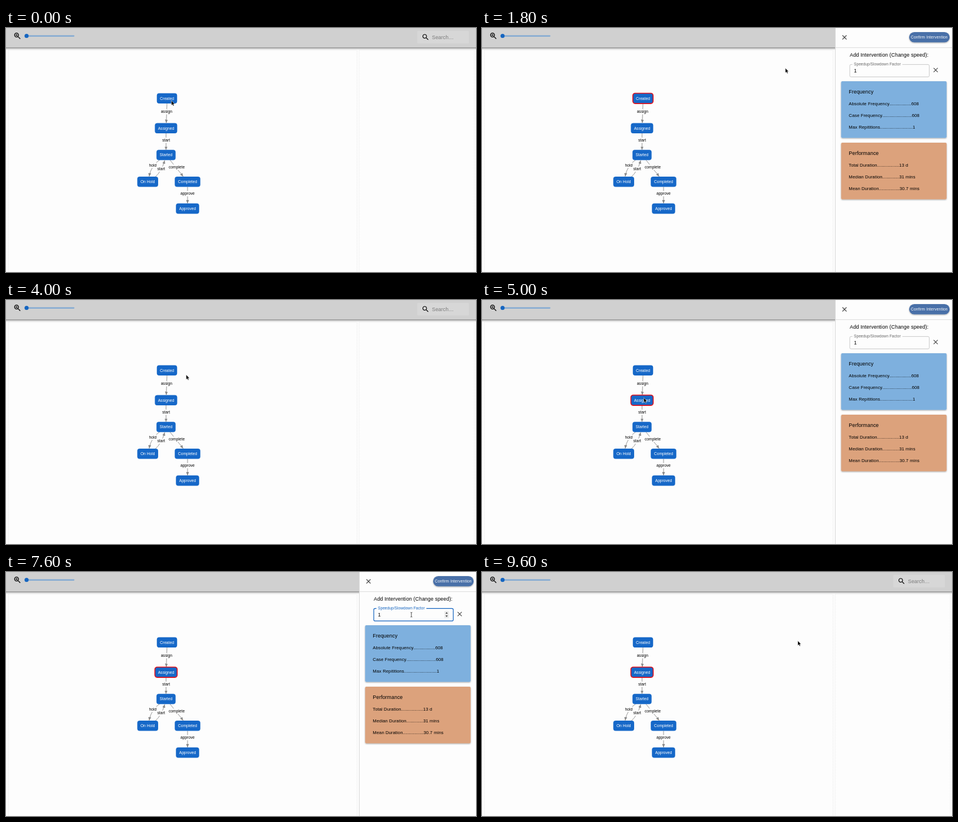
Write an HTML page that moves like this. It is 800 px wide and 417 px high and loops after 9700 ms.

```html
<!DOCTYPE html>
<html lang="en">
<head>
<meta charset="utf-8">
<title>Process graph intervention</title>
<style>
html, body { margin: 0; width: 100%; height: 100%; overflow: hidden; background: #fdfdfd; }
svg { display: block; width: 100%; height: 100%; font-family: "Liberation Sans", Arial, sans-serif; }
.graph text { font-size: 6.7px; text-anchor: middle; }
.node rect { fill: #1668c8; }
.node text { fill: #fff; }
.node.selected rect { stroke: #e3121c; stroke-width: 1.6; }
.edge { fill: none; stroke: #8c8c8c; stroke-width: .9; marker-end: url(#arrow); }
.frame { fill: none; stroke: #e6e6e6; stroke-width: .8; stroke-dasharray: 1.5 1; }
.title { font-size: 8.75px; letter-spacing: .00938em; }
.row { font-size: 7.65px; letter-spacing: .01071em; }
.cross { stroke: #444; stroke-width: 1.1; }
</style>
</head>
<body>
<svg viewBox="0 0 800 417" preserveAspectRatio="none">
  <defs>
    <marker id="arrow" viewBox="0 0 6 5" refX="5.5" refY="2.5" markerWidth="6" markerHeight="5"
      markerUnits="userSpaceOnUse" orient="auto"><path d="M0 0L6 2.5L0 5z" fill="#8c8c8c"/></marker>
    <linearGradient id="shade" x2="0" y2="1">
      <stop stop-color="#000" stop-opacity=".48"/>
      <stop offset=".4" stop-color="#000" stop-opacity=".2"/>
      <stop offset="1" stop-color="#000" stop-opacity="0"/>
    </linearGradient>
    <filter id="lift" x="-10%" y="-20%" width="120%" height="150%">
      <feDropShadow dx="0" dy="1" stdDeviation=".8" flood-opacity=".35"/>
    </filter>
    <path id="lens" d="M15.5 14h-.79l-.28-.27C15.41 12.59 16 11.11 16 9.5 16 5.91 13.09 3 9.5 3S3 5.91 3 9.5 5.91 16 9.5 16c1.61 0 3.09-.59 4.23-1.57l.27.28v.79l5 4.99L20.49 19l-4.99-5zm-6 0C7.01 14 5 11.99 5 9.5S7.01 5 9.5 5 14 7.01 14 9.5 11.99 14 9.5 14z"/>
  </defs>

  <rect width="800" height="417" fill="#fdfdfd"/>
  <rect class="frame" x="4" y="38" width="593.5" height="390"/>
  <rect class="frame" x="601" y="38" width="196" height="390"/>
  <g class="graph" id="graph"></g>

  <rect width="800" height="33.5" fill="#d0d0d0"/>
  <rect y="33.3" width="800" height="4.5" fill="url(#shade)"/>
  <g transform="translate(12 6.2) scale(.62)"><use href="#lens"/><path d="M12 10h-2v2H9v-2H7V9h2V7h1v2h2v1z" stroke="#000" stroke-width=".5"/></g>
  <rect x="35" y="12.4" width="81.5" height="2.3" rx="1.1" fill="#7ea8d3"/>
  <circle cx="35" cy="13.6" r="3.5" fill="#1565c0"/>
  <rect x="700" y="5" width="88" height="21.5" rx="2" fill="#d7d7d7"/>
  <use href="#lens" transform="translate(707.2 8.7) scale(.58)"/>
  <text x="725" y="19" class="title" fill="#7b7b7b">Search…</text>

  <g id="drawer">
    <rect x="601.5" width="200" height="417" fill="#fdfdfd"/>
    <path d="M601.5 0V417M601.5 33.6H800" stroke="#dcdcdc"/>
    <path class="cross" d="M613.5 12.5l7 7m0-7l-7 7M768.7 68.4l7 7m0-7l-7 7"/>
    <rect id="button" x="727" y="7" width="69" height="17.6" rx="8.8" filter="url(#lift)"/>
    <text x="730" y="18.2" fill="#fff" font-size="6.56" letter-spacing=".187">Confirm Intervention</text>
    <text x="626" y="48.7" class="title">Add Intervention (Change speed):</text>
    <rect id="field" x="626" y="62.4" width="135.3" height="21.2" rx="2.2" fill="none"/>
    <rect x="630.5" y="60" width="85" height="5" fill="#fdfdfd"/>
    <text id="label" x="633" y="64.4" font-size="6.56" letter-spacing=".06">Speedup/Slowdown Factor</text>
    <text id="value" x="633" y="76.3" class="title"></text>
    <g id="spinner">
      <rect x="746" y="66.5" width="8" height="12.5" rx="1.5" fill="#ececec"/>
      <path d="M748 71.2l2-2.8 2 2.8zM748 74.3l2 2.8 2-2.8z" fill="#444"/>
    </g>
    <g id="cards"></g>
  </g>

  <g id="cursor" stroke="#fff" stroke-width=".5" stroke-linejoin="round">
    <path id="pointer" d="M0 0V8.2L1.8 6.6L3.1 9.3L4.5 8.7L3.3 6H5.7z"/>
    <path id="hand" d="M-.9 .7Q0 -.7 .8 .7V3.4Q1.7 2.8 2.4 3.7Q3.4 3.2 3.9 4.2Q5.2 4 5.1 5.4L4.3 9.3H-.7L-3.3 5.7Q-3 4.4 -.9 6z"
      fill="#fff" stroke="#111" stroke-width=".8"/>
    <path id="beam" d="M-1.5 -4Q0 -4 0 -3V3Q0 4 1.5 4M1.5 -4Q0 -4 0 -3M0 3Q0 4 -1.5 4" fill="none" stroke="#222" stroke-width=".8"/>
  </g>
</svg>
<script>
const LOOP = 9700, STEP = 100;
const $ = id => document.getElementById(id);

const nodes = [
  ["Created", 274, 120.3, 34.5], ["Assigned", 272.4, 171.3, 38], ["Started", 272.4, 217, 32.5],
  ["On Hold", 241.2, 262.8, 35.5], ["Completed", 309, 262.8, 43.5], ["Approved", 309, 308.6, 39.5]
];
const edges = [
  ["assign", 273.3, 143.2, "M274 129L272.8 162"],
  ["start", 272.5, 191.8, "M272.4 180V208"],
  ["hold", 249.8, 234.6, "M262 225Q247 235 243.7 253.5"],
  ["start", 264, 241.2, "M254 254.5Q265 245 270 226.5"],
  ["complete", 290.6, 237.8, "M279 225.5L301.5 253.5"],
  ["approve", 309, 283.2, "M309 271.5V299.5"]
];
$("graph").innerHTML =
  edges.map(e => `<path class="edge" d="${e[3]}"/>`).join("") +
  edges.map(([name, x, y]) => {
    const w = name.length * 3.4;
    return `<rect x="${x - w / 2}" y="${y - 4.5}" width="${w}" height="9" fill="#fdfdfd"/>
      <text x="${x}" y="${y + 2}">${name}</text>`;
  }).join("") +
  nodes.map(([name, x, y, w]) => `<g class="node" id="${name}">
    <rect x="${x - w / 2}" y="${y - 8.8}" width="${w}" height="17.6" rx="4"/>
    <text x="${x}" y="${y + 2.2}">${name}</text></g>`).join("");

const cards = [
  [91, "#7eb0de", "Frequency", [["Absolute Frequency", 17, "608"], ["Case Frequency", 23, "608"], ["Max Repititions", 25, "1"]]],
  [196, "#dca27c", "Performance", [["Total Duration", 17, "13 d"], ["Median Duration", 13, "31 mins"], ["Mean Duration", 16, "30.7 mins"]]]
];
$("cards").innerHTML = cards.map(([y, color, title, rows]) => `
  <rect x="611.3" y="${y}" width="179.5" height="96.8" rx="2" fill="${color}" filter="url(#lift)"/>
  <text x="624.3" y="${y + 20.9}" class="title">${title}</text>` +
  rows.map(([name, dots, value], i) =>
    `<text x="624.3" y="${y + 41.3 + i * 19.7}" class="row">${name}${".".repeat(dots)}${value}</text>`).join("")
).join("");

// time, x, y of the mouse
const path = [
  [0, 281.5, 124], [500, 279, 121], [1100, 279, 121], [1800, 516.3, 68.5], [2100, 680, 110],
  [2400, 690, 235], [2700, 660, 90], [2950, 617, 15], [3200, 617, 15], [4000, 306.7, 127.7],
  [4200, 306.7, 127.7], [4500, 275.3, 167], [5200, 275.3, 167], [6300, 767, 20], [6600, 767, 20],
  [7200, 690, 73], [8200, 690, 73], [8800, 756.5, 16], [9100, 756.5, 16], [9500, 612, 83.5],
  [9600, 537.5, 117.5], [9700, 537.5, 117.5]
];
const clamp = v => Math.max(0, Math.min(1, v));
const smooth = v => v * v * (3 - 2 * v);
const within = (t, a, b) => t >= a && t < b;

function mouseAt(t) {
  const i = path.findIndex(p => p[0] > t);
  const [t0, x0, y0] = path[i - 1], [t1, x1, y1] = path[i];
  const k = smooth((t - t0) / (t1 - t0));
  return [x0 + (x1 - x0) * k, y0 + (y1 - y0) * k];
}

function drawerAt(t) {
  const enter = start => 1 - (1 - clamp((t - start) / 225)) ** 3;
  const leave = start => smooth(clamp((t - start) / 195));
  return enter(750) - leave(3050) + enter(4650) - leave(9050);
}

const show = (id, visible) => $(id).style.display = visible ? "" : "none";
const paint = (id, props) => Object.entries(props).forEach(([k, v]) => $(id).setAttribute(k, v));

function draw(t) {
  const [x, y] = mouseAt(t), open = drawerAt(t);
  const isOpen = open > .95;
  const onButton = isOpen && x > 727 && x < 796 && y > 7 && y < 25;
  const onClose = isOpen && Math.hypot(x - 617, y - 16) < 8;
  const onField = isOpen && x > 626 && x < 761 && y > 62 && y < 84;
  const focused = t >= 7300;

  $("Created").classList.toggle("selected", within(t, 800, 3100));
  $("Assigned").classList.toggle("selected", t >= 4600);

  show("drawer", open > 0);
  paint("drawer", { transform: `translate(${(1 - open) * 200} 0)` });
  paint("button", { fill: onButton ? "#0f59b8" : "#4a70a8" });
  paint("field", { stroke: focused ? "#1565c0" : "#bdbdbd", "stroke-width": focused ? 1.2 : .8 });
  paint("label", { fill: focused ? "#1565c0" : "#666" });
  $("value").textContent = t < 7800 ? "1" : t < 8000 ? "" : "5";
  show("spinner", focused || onField);

  paint("cursor", { transform: `translate(${x} ${y})` });
  show("hand", onButton || onClose);
  show("beam", onField);
  show("pointer", !onButton && !onClose && !onField);
}

const origin = performance.now();
function tick() {
  const t = (performance.now() - origin) % LOOP;
  draw(Math.floor(t / STEP) * STEP);
  requestAnimationFrame(tick);
}
tick();
</script>
</body>
</html>
```
